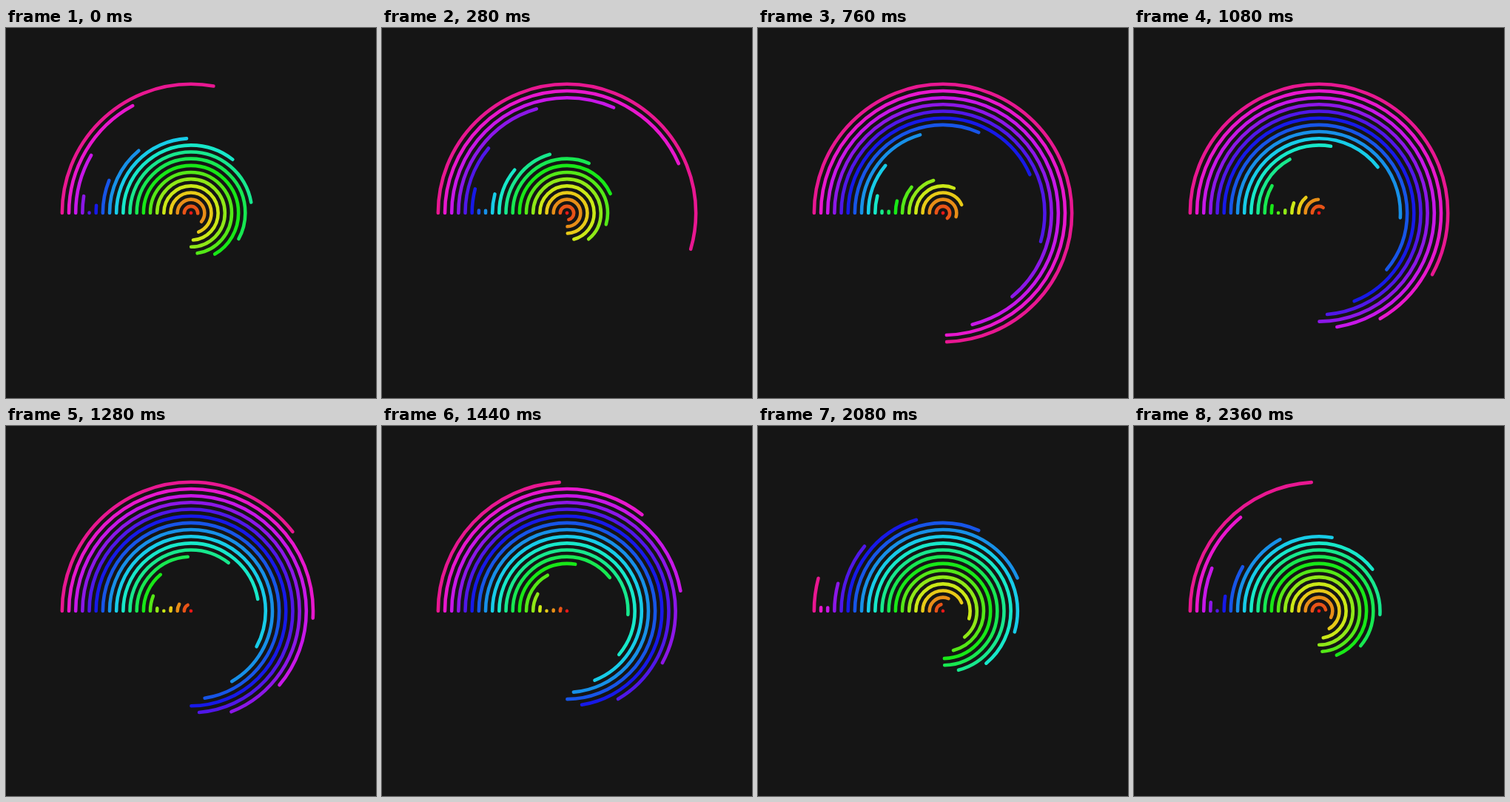
These frames come from a looping animation (500 px wide and 500 px high, 2400 ms). An HTML page with a canvas:

```html
<!DOCTYPE html>
<html lang="en">
<head>
<meta charset="utf-8">
<title>Rainbow arcs</title>
<style>
  html, body { margin: 0; width: 100%; height: 100%; overflow: hidden; background: #151515; }
  canvas { display: block; width: 500px; height: 500px; }
</style>
</head>
<body>
<canvas id="stage" width="500" height="500"></canvas>
<script>
  const ctx = document.getElementById('stage').getContext('2d');
  const SIZE = 500, LOOP = 2400, TICK = 40;
  const RINGS = 20, GAP = 55 / 6, MAX_SWEEP = Math.PI * 1.5;
  const START = 1780; // moment at which the innermost ring is closed

  function drawRing(i, time) {
    const phase = (time - START) / LOOP + i / RINGS;
    const sweep = MAX_SWEEP * (1 - Math.cos(phase * 2 * Math.PI)) / 2;
    ctx.strokeStyle = `hsl(${i * 17.1}, 82%, 50%)`;
    ctx.beginPath();
    // tiny minimums keep the round caps visible as a dot
    ctx.arc(SIZE / 2, SIZE / 2, Math.max(i * GAP, 0.1), Math.PI, Math.PI + Math.max(sweep, 0.002));
    ctx.stroke();
  }

  function draw(time) {
    ctx.fillStyle = '#151515';
    ctx.fillRect(0, 0, SIZE, SIZE);
    ctx.lineWidth = GAP / 2;
    ctx.lineCap = 'round';
    for (let i = 0; i < RINGS; i++) drawRing(i, time);
  }

  function frame(now) {
    draw(Math.floor((now % LOOP) / TICK) * TICK);
    requestAnimationFrame(frame);
  }

  draw(0);
  requestAnimationFrame(frame);
</script>
</body>
</html>
```
